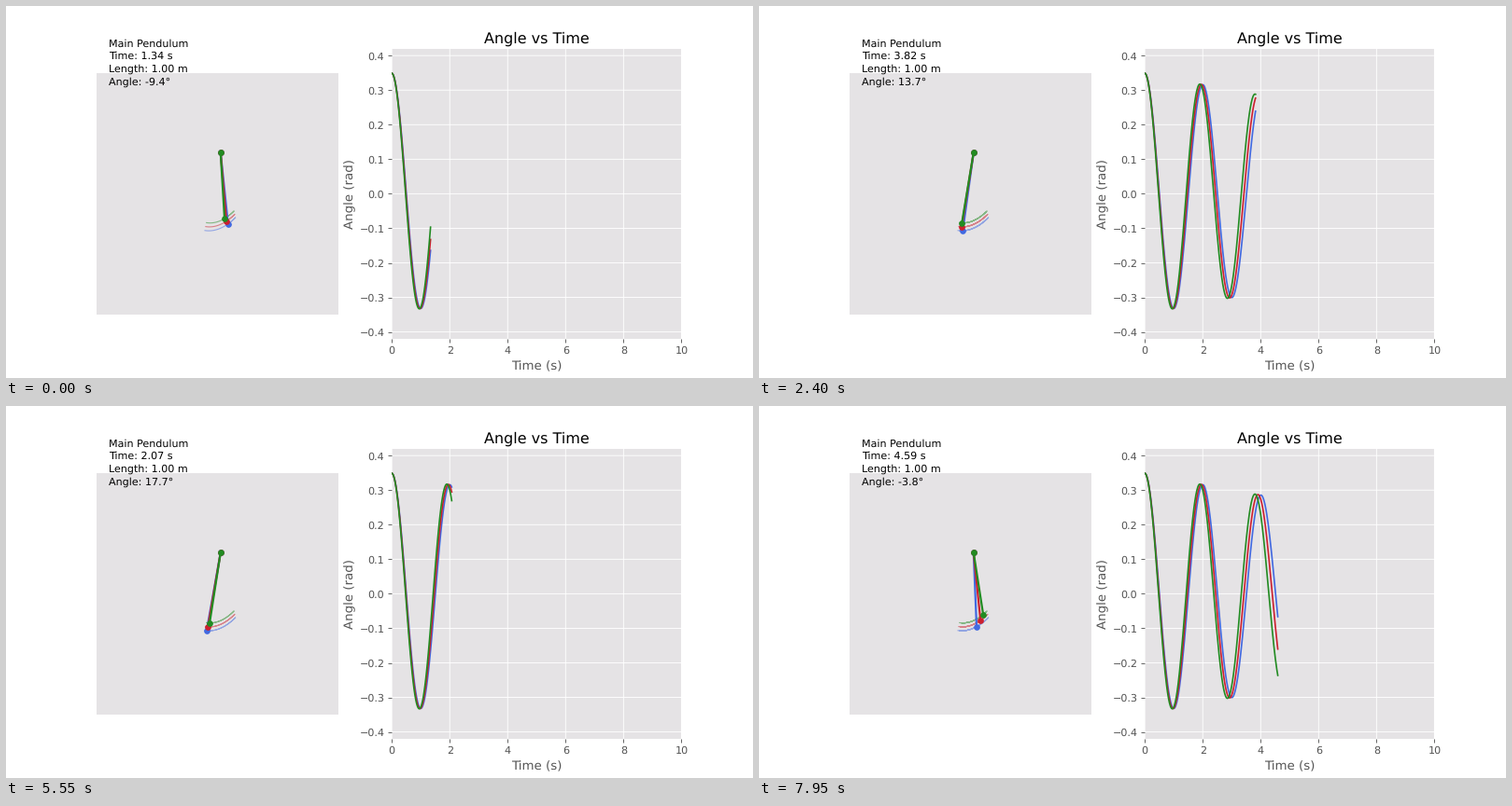
Animation of 800x399 px, one loop 8 s. Source, as a matplotlib script:

```python
import numpy as np
import matplotlib.pyplot as plt
from matplotlib.animation import FuncAnimation

W, H, DPI = 800, 399, 80
FRAMES, INTERVAL = 160, 50

THETA0 = np.radians(20)
DAMPING = 0.05
GRAVITY = 9.81

# (length, colour), the first one is the main pendulum
PENDULUMS = [(1.00, "royalblue"), (0.95, "#cc1f2e"), (0.90, "forestgreen")]

# Tilted view of the swing plane, in stage pixels per metre
PIVOT = np.array([229.8, 157.3])
SIDE = np.array([-49.0, 21.5])
DOWN = np.array([0.0, 81.0])

# Clock readings (frame, seconds) for the two runs; it drifts a little
RESTART = 72
RUN_A = [(0, 1.3365), (17, 2.23), (33, 3.0725), (48, 3.8227),
         (51, 4.005), (68, 4.88), (71, 5.0)]
RUN_B = [(72, 0.0), (84, 0.634), (102, 1.575), (111, 2.0675),
         (138, 3.4725), (159, 4.5907)]


def clock(frame):
    run = RUN_A if frame < RESTART else RUN_B
    return float(np.interp(frame, *zip(*run)))


def angle(t, length):
    return THETA0 * np.exp(-DAMPING * t) * np.cos(np.sqrt(GRAVITY / length) * t)


def bob(theta, length):
    theta = np.atleast_1d(theta)[:, None]
    return PIVOT + length * (np.sin(theta) * SIDE + np.cos(theta) * DOWN)


def add_axes(left, top, right, bottom):
    box = [left / W, 1 - bottom / H, (right - left) / W, (bottom - top) / H]
    return fig.add_axes(box, facecolor="#e5e3e5")


plt.rcParams["font.family"] = "DejaVu Sans"
plt.rcParams["text.hinting"] = "none"
fig = plt.figure(figsize=(W / DPI, H / DPI), dpi=DPI, facecolor="white")

# Pendulum view, in stage pixel coordinates
view = add_axes(97, 72, 355.5, 330.5)
view.set(xlim=(97, 355.5), ylim=(330.5, 72), xticks=[], yticks=[])

# Angle chart
chart = add_axes(413.2, 46.2, 723.4, 356.6)
chart.set(xlim=(0, 10), ylim=(-1.2 * THETA0, 1.2 * THETA0))
chart.set_title("Angle vs Time", fontsize=14.4, color="black", pad=5.5)
chart.set_xlabel("Time (s)", fontsize=12, color="#555555", labelpad=5)
chart.set_ylabel("Angle (rad)", fontsize=12, color="#555555", labelpad=3)
chart.tick_params(color="#555555", labelcolor="#555555", labelsize=10)
chart.set_axisbelow(True)
chart.grid(color="white", linewidth=0.8, snap=False)

for ax in (view, chart):
    for spine in ax.spines.values():
        spine.set_visible(False)

trails = [view.plot([], [], color=c, lw=1, alpha=0.5, zorder=2)[0]
          for _, c in PENDULUMS]
rods = [view.plot([], [], "o-", color=c, lw=2, ms=5, zorder=3)[0]
        for _, c in PENDULUMS]
curves = [chart.plot([], [], color=c, lw=1.5)[0] for _, c in PENDULUMS]

info = [view.text(109.9, 43.4 + 13.85 * i, "", fontsize=10, color="black",
                  va="baseline", zorder=5) for i in range(4)]


def update(frame):
    t = clock(frame)
    past = np.linspace(0, t, 2 + int(t * 60))
    for (length, _), trail, rod, curve in zip(PENDULUMS, trails, rods, curves):
        theta = angle(past, length)
        path = bob(theta, length)
        trail.set_data(path[:, 0], path[:, 1])
        rod.set_data([PIVOT[0], path[-1, 0]], [PIVOT[1], path[-1, 1]])
        curve.set_data(past, theta)

    length = PENDULUMS[0][0]
    degrees = np.degrees(angle(t, length))
    lines = ["Main Pendulum", f"Time: {t:.2f} s", f"Length: {length:.2f} m",
             f"Angle: {degrees:.1f}°"]
    for label, line in zip(info, lines):
        label.set_text(line)
    return trails + rods + curves + info


anim = FuncAnimation(fig, update, frames=FRAMES, interval=INTERVAL,
                     init_func=lambda: update(0), repeat=True, repeat_delay=0)
plt.show()
```
